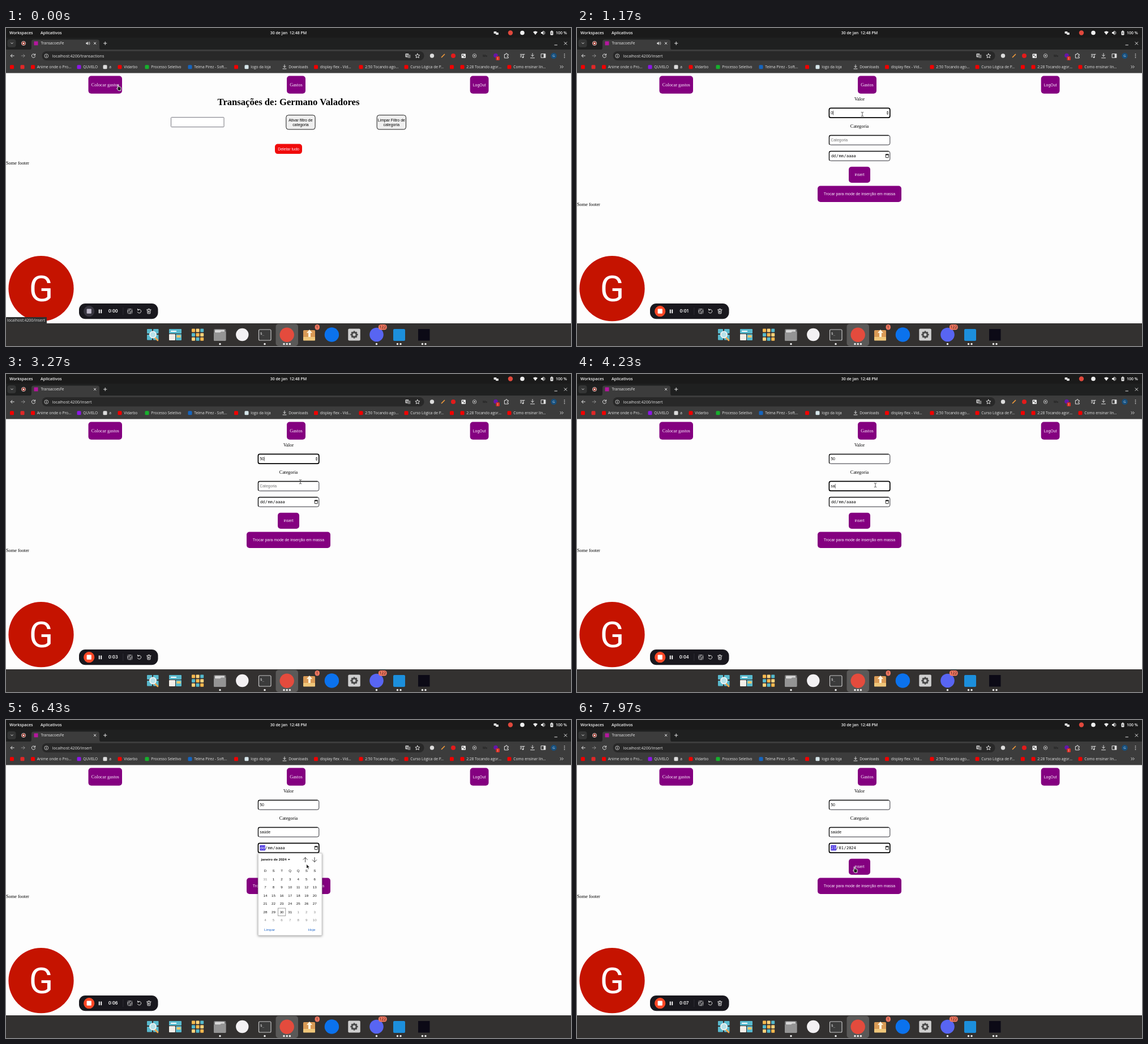
These frames come from a looping animation (998x561 px, 8000 ms). An HTML page:

```html
<!DOCTYPE html>
<html lang="pt-BR">
<head>
<meta charset="utf-8">
<title>Transações</title>
<style>
html, body { margin: 0; width: 100%; height: 100%; overflow: hidden; background: #fdfdfd; }
svg { display: block; width: 100vw; height: 100vh; }
text { white-space: pre; }
.ui { font-family: "Open Sans", "Noto Sans", sans-serif; }
.serif { font-family: "Liberation Serif", serif; font-size: 8.32px; }
.sans { font-family: "Liberation Sans", sans-serif; font-size: 6.93px; }
.mono { font-family: "DejaVu Sans Mono", monospace; font-size: 6.93px; }
.bold { font-weight: 700; }
.semi { font-weight: 600; }
.mid { text-anchor: middle; }
.line { fill: none; stroke: #e3e3e3; stroke-width: 1; stroke-linecap: round; stroke-linejoin: round; }
</style>
</head>
<body>
<svg viewBox="0 0 998 561" preserveAspectRatio="none">
  <g id="page"></g><g id="shell"></g><g id="overlay"></g>
</svg>
<script>
const LOOP = 8000;
const PURPLE = '#840080', BLUE = '#4a35e0', RED = '#f00b0b';

const rect = (x, y, w, h, fill, rx = 0, extra = '') =>
  `<rect x="${x}" y="${y}" width="${w}" height="${h}" rx="${rx}" fill="${fill}" ${extra}/>`;
const circle = (x, y, r, fill, extra = '') => `<circle cx="${x}" cy="${y}" r="${r}" fill="${fill}" ${extra}/>`;
const shape = (d, fill, extra = '') => `<path d="${d}" fill="${fill}" ${extra}/>`;
const line = (d, extra = '') => `<path class="line" d="${d}" ${extra}/>`;
const text = (x, y, str, cls, fill = '#000', size) =>
  `<text x="${x}" y="${y}" class="${cls}" fill="${fill}" ${size ? `style="font-size:${size}px"` : ''}>${str}</text>`;
const range = n => [...Array(n).keys()];

// ---------- desktop and browser frame ----------
function topBar() {
  return rect(0, 0, 998, 17, '#1a1a1a') +
    text(6, 11, 'Workspaces', 'ui semi', '#f4f4f4', 7.2) +
    text(61, 11, 'Aplicativos', 'ui semi', '#f4f4f4', 7.2) +
    text(499, 11, '30 de jan  12:48 PM', 'ui semi mid', '#f4f4f4', 7) +
    text(971, 11, '100 %', 'ui semi', '#f4f4f4', 7) +
    rect(861.5, 6, 5, 4, '#ddd', 1) + rect(865, 8, 5, 4, '#ddd', 1) +
    circle(891, 8.5, 4.2, '#e0483c') + circle(912, 8.5, 3.8, '#eee') +
    shape('M931 7q4-3 8 0l-4 5z', '#eee') +
    shape('M945 7h2l2.5-2.5v8l-2.5-2.5h-2z', '#eee') + line('M951 6q2 2.5 0 5') +
    rect(961.5, 5.5, 5, 7, '#eee', 1) + rect(963, 4.5, 2, 1, '#eee') +
    shape('M964.4 6.5l-1.8 3h1.4l-.4 2 1.8-3h-1.4z', '#333');
}

function tabStrip() {
  return rect(0, 17, 998, 22, '#1f2020') +
    rect(2.5, 20, 15, 14, '#343535', 4) + line('M8.7 26l1.8 1.8 1.8-1.8') +
    circle(31, 27, 3.6, '#8f2418', 'stroke="#ddd" stroke-width=".9"') + circle(31, 27, 1.5, '#fff') +
    shape('M41 38.5q4 0 4-4v-10q0-4 4-4h112q4 0 4 4v10q0 4 4 4z', '#3c3c3c') +
    rect(49.5, 23.5, 7, 7, '#b5179e') +
    text(61.5, 29.3, 'TransacoesFe', 'ui', '#e8e8e8', 6.5) +
    line('M155.3 25.2l3.6 3.6m0-3.6l-3.6 3.6') +
    line('M172.5 27h5.4m-2.7-2.7v5.4') +
    line('M969 30h4.5m12.6-5.2l4.6 4.6m0-4.6l-4.6 4.6', 'stroke-width="1.2"');
}

function toolbar() {
  const extensions =
    circle(752.5, 49, 3.7, '#ddd') + line('M769.5 51.5l5-5', 'style="stroke:#ef9a3c;stroke-width:1.7"') +
    circle(790, 49, 4, '#e31b1b') + rect(804.5, 45.5, 7.5, 7.5, '#eee', 1) +
    rect(806, 47, 2, 2, '#444') + rect(808.5, 49.5, 2, 2, '#444') +
    circle(827.5, 49, 3.3, 'none', 'stroke="#bbb"') + circle(827.5, 49, 1.3, '#ccc') +
    text(846, 51, 'Ms', 'ui mid bold', '#222', 5.5) +
    circle(865, 48.5, 3.8, '#6517a8') + rect(865.5, 50, 6.5, 7, '#d93025', 1.5) +
    text(868.8, 55.6, '1', 'ui mid', '#fff', 5) +
    line('M880.8 46.5h2q0-2 1.2-2t1.2 2h2v2q-2 0-2 1.2t2 1.2v2h-6.4z') +
    line('M908.5 46.5h5m-5 2.2h3m-3 2.2h2m3.5 1v-5.5h2') + circle(913, 51.8, 1.3, '#e3e3e3') +
    line('M930 44.8v5m-2.3-2l2.3 2.3 2.3-2.3M926.5 52.8h7') +
    line('M945.5 45.7h7.4v6.6h-7.4z') + rect(949.7, 46, 3, 6, '#e3e3e3') +
    circle(967.5, 49, 5.2, '#174f7c') + text(967.5, 51.2, 'G', 'ui mid', '#cfe5ff', 6) +
    [46, 49, 52].map(y => circle(986.5, y, .85, '#e3e3e3')).join('');
  return rect(0, 38, 998, 41.5, '#3c3c3c') +
    line('M14.2 49H8.3m2.6-2.7L8.3 49l2.6 2.7') +
    line('M27.2 49h5.9m-2.6-2.7l2.6 2.7-2.6 2.7', 'opacity=".45"') +
    line('M51.4 47.5a3.2 3.2 0 1 0 .2 2.7m0-4.5v2.4h-2.4') +
    rect(63.5, 41, 675, 16.3, '#282828', 8.1) +
    circle(71.3, 49.2, 3.4, 'none', 'stroke="#ddd" stroke-width=".8"') + line('M71.3 49v1.8m0-3.4v.1') +
    rect(705.5, 45, 5.8, 6.5, '#ccc', 1) + rect(709.5, 47, 5, 6, '#777', 1) +
    text(708.4, 50.2, 'G', 'ui mid bold', '#333', 4.5) +
    line('M726.8 45.2l1.2 2.5 2.8.3-2.1 1.9.6 2.7-2.5-1.4-2.4 1.4.6-2.7-2.1-1.9 2.8-.3z', 'stroke-width=".8"') +
    extensions;
}

function bookmarks() {
  const red = '#f00000';
  const items = [
    [10.5, red], [29, '#e02828'], [47.5, red, 'Anime onde o Pro...'], [129, '#8d16e8', 'QUVELO'],
    [175, '#ddd', 'a'], [201, red, 'Vidarbo'], [249, '#16b02c', 'Processo Seletivo'],
    [325, '#1565c0', 'Telma Pirez - Soft...'], [406.5, red], [425, '#d5e5ea', 'logo da loja'],
    [492, null, 'Downloads'], [547.5, red, 'display flex - Vid...'], [627, red, '2:50 Tocando ago...'],
    [707, red, 'Curso Lógica de P...'], [787.5, red], [806, red, '2:28 Tocando agor...'],
    [889, red, 'Como ensinar lin...']
  ];
  return items.map(([x, color, label]) =>
    (color ? rect(x - 3.5, 65.3, 7, 7, color, 1.5) : line(`M${x} 65v4.5m-2-2l2 2 2-2M${x - 3} 72h6`)) +
    (label ? text(x + 7.3, 71, label, 'ui', '#e3e3e3', 6.6) : '')).join('') +
    line('M979 66.5l2 2-2 2m3.2-4l2 2-2 2');
}

function dock() {
  const dot = x => circle(x, 557.5, 1.7, '#f2f2f2');
  const badge = (x, w, n) => rect(x - w / 2, 523, w, 9.5, '#ef765f', 4.5) + text(x, 530.2, n, 'ui mid', '#331a16', 6.8);
  const gridColors = ['#f8b84e', '#ffd27a', '#54b9cc'];
  const gearTeeth = range(8).map(i =>
    rect(613.7, 534.4, 2.6, 3, '#4b4b4b', 0, `transform="rotate(${i * 45} 615 541)"`)).join('');
  return rect(0, 521, 998, 40, '#333130') + rect(476.5, 522, 39.5, 39, '#5a5958', 5) +
    // launcher
    rect(249, 531, 9, 8, '#58b9cd', 1) + rect(260, 531, 9.5, 8, '#58b9cd', 1) +
    rect(249, 541, 9, 9.5, '#58b9cd', 1) + rect(260, 541, 9.5, 9.5, '#58b9cd', 1) +
    line('M263 546l5 5', 'style="stroke:#f3a64a;stroke-width:2.6"') +
    circle(259.5, 541, 5.6, '#b8e3ea', 'stroke="#f4f4f4" stroke-width="1.7"') +
    // workspaces
    rect(288, 531, 22, 8, '#58b9cd', 1) + rect(288, 540, 11, 11, '#f2eee8', 1) + rect(300, 540, 10, 11, '#58b9cd', 1) +
    rect(291, 534, 10, 2, '#fff') + rect(301.5, 542, 7, 4, '#f8c66a') +
    // applications
    range(9).map(i => rect(328 + i % 3 * 7.6, 530.6 + (i / 3 | 0) * 7.6, 6, 6, gridColors[(i + (i / 3 | 0) * 2) % 3], 1)).join('') +
    // files
    rect(367, 531, 21.5, 21, '#777', 2) + rect(369, 532.5, 17, 5, '#d9d9d9', 1) +
    shape('M367 537.5h11l2-2h8.5v15q0 1.5-1.5 1.5h-18.500q-1.5 0-1.5-1.5z', '#949494') +
    circle(417.3, 541, 11.2, '#f3f1f3') +
    // terminal
    rect(446.5, 532, 21.5, 19, '#3b3b3b', 2, 'stroke="#c5c5c5" stroke-width="1.2"') + text(449, 540.5, '$_', 'mono', '#eee', 6) +
    circle(496.2, 541.2, 12.7, '#e44b3d') +
    // package installer
    rect(525, 533, 21, 18, '#d99a55', 1.5) + rect(525, 545, 21, 6.5, '#f0c77a', 1) +
    shape('M536 532l5 6h-3v7h-4v-7h-3z', '#fff3dd') + badge(549.8, 8.5, '1') +
    circle(575.4, 541, 12.7, '#0b72ed') +
    // settings
    rect(604.3, 530.5, 21.500, 21, '#cfcfcf', 2) + gearTeeth + circle(615, 541, 4, 'none', 'stroke="#4b4b4b" stroke-width="3"') +
    circle(654.5, 541, 12.3, '#5865f2') + badge(665.3, 15, '122') +
    rect(684, 531, 21, 21, '#1c8fdc', 2) + rect(728, 531, 20.5, 20.5, '#0c0a16') +
    [378, 457, 491, 496.2, 501.400, 654.5, 691.5, 697, 735.5, 741].map(dot).join('');
}

function recorder() {
  return circle(62, 459.7, 57.6, '#c51300') +
    `<text x="62" y="482.300" class="mid" fill="#fff" style="font:400 62.5px Roboto,sans-serif">G</text>` +
    rect(129, 486, 139.5, 27.2, '#19181e', 11) +
    rect(163.8, 496.4, 1.900, 6.800, '#fff', .5) + rect(167.300, 496.4, 1.900, 6.800, '#fff', .5) +
    rect(206.5, 493, .7, 13, '#37363c') +
    range(16).map(i => circle(215 + i % 4 * 2.5, 496 + (i / 4 | 0) * 2.5, i % 3 ? .9 : .6, '#ddd')).join('') +
    line('M232.800 497.5a3.300 3.300 0 1 1-.5 3.500m.3-5.5v2.200h2.300') +
    line('M248.500 497h7.600m-5-1.300h2.500m-4 1.600l.5 6.500h4.500l.5-6.500m-3.700 2v2.500m1.500-2.500v2.500', 'stroke-width=".9"');
}

// ---------- web pages ----------
function button(x, y, w, h, label, cls = 'sans', fill = PURPLE) {
  const baseline = y + h / 2 + (cls === 'serif' ? 2.6 : 2.4);
  return rect(x, y, w, h, fill, 5) + text(x + w / 2, baseline, label, cls + ' mid', '#fbeefb');
}

const nav = button(145.5, 84.5, 59.5, 31.3, 'Colocar gastos', 'serif') +
  button(496, 84.5, 33, 31.3, 'Gastos', 'serif') + button(819.7, 84.5, 32.8, 31.3, 'LogOut');

function listPage() {
  const filter = (x, label) => rect(x, 153.7, 51.3, 25.2, '#efefef', 4, 'stroke="#1c1c1c"') +
    text(x + 25.6, 164.900, label, 'sans mid') + text(x + 25.6, 172.6, 'categoria', 'sans mid');
  return nav + text(499, 136.2, 'Transações de: Germano Valadores', 'serif mid bold', '#000', 16.63) +
    rect(291.5, 157.6, 93.5, 17, '#fff', 1, 'stroke="#76767f"') +
    filter(494.8, 'Ativar filtro de') + filter(655.2, 'Limpar Filtro de') +
    button(475, 204.5, 48, 17.6, 'Deletar tudo', 'sans', RED) + text(0, 241, 'Some footer', 'serif');
}

const fieldBox = (y, focused) =>
  rect(445.4, y + .4, 107.4, 16.8, '#fff', 3, `stroke="${focused ? '#000' : '#33333a'}" stroke-width="${focused ? 1.7 : 1}"`) +
  (focused ? '' : line(`M445.5 ${y + 16}V${y + 3}q0-2.500 2.500-2.500h102`, 'style="stroke:#111;stroke-width:1.3"'));

function textField(y, value, hint, focused, blinkOn) {
  const caret = focused && blinkOn ? rect(448.2 + value.length * 3.8, y + 4.8, .6, 8, '#000') : '';
  return fieldBox(y, focused) + text(448.2, y + 11.3, value || hint, 'sans', value ? '#111' : '#757575') + caret;
}

function dateField(day, month, year, focused) {
  const y = 228.2;
  return fieldBox(217, focused) + (focused ? rect(448.4, 221, 9.5, 9.2, BLUE) : '') +
    text(448.9, y, day, 'mono', focused ? '#fff' : '#000') + text(457.8, y, '/', 'mono') +
    text(462.5, y, month, 'mono') + text(471.4, y, '/', 'mono') + text(476, y, year, 'mono') +
    rect(545.3, 223, 5, 5.6, 'none', .5, 'stroke="#111" stroke-width=".9"') + rect(545, 222.5, 5.6, 1.8, '#111');
}

function calendar(selected, hovered) {
  const X = 458, Y = 280.5, STEP = 14.55, SIZE = 6.24;
  const dayCell = i => {
    const x = X + i % 7 * STEP, y = Y + (i / 7 | 0) * STEP;
    const outside = i < 1 || i > 31, day = i < 1 ? 31 : outside ? i - 31 : i;
    const active = i === selected;
    const cell = (fill, stroke, w) => rect(x - 6.7, y - 6.7, 13.4, 13.4, fill, 0, `stroke="${stroke}" stroke-width="${w}"`);
    const box = active ? cell(BLUE, '#000', 1.3) : i === 30 ? cell('#fff', '#888', .8) : i === hovered ? cell('#e6e6ea', 'none', 0) : '';
    return box + text(x, y + 2.2, day, 'sans mid' + (active ? ' bold' : ''), active ? '#fff' : outside ? '#858585' : '#111', SIZE);
  };
  return rect(445.3, 235, 112.7, 145, '#fff', 1, 'stroke="#c4c4c4" stroke-width=".8" style="filter:drop-shadow(0 1px 2px #0006)"') +
    text(450.5, 248.3, 'janeiro de 2024', 'sans bold', '#111', SIZE) + shape('M497.800 245.200h4l-2 2.300z', '#111') +
    line('M528.6 250.700v-8m-3.700 3.700l3.700-3.700 3.700 3.700M545 242.500v8m-3.700-3.700l3.700 3.700 3.700-3.700', 'style="stroke:#333;stroke-width:.9"') +
    [...'DSTQQSS'].map((d, i) => text(X + i * STEP, 267.6, d, 'sans mid', '#111', SIZE)).join('') +
    range(42).map(dayCell).join('') +
    text(456, 371.6, 'Limpar', 'sans', '#1f66c9', SIZE) + text(540, 371.6, 'Hoje', 'sans mid', '#1f66c9', SIZE);
}

// ---------- timeline ----------
const T = { page: 130, record: 300, focusValue: 1000, focusCategory: 3960, focusDate: 5430, open: 6130, pick: 6870, close: 7400 };
const VALUE = [[0, '0'], [1600, ''], [2450, '5'], [2650, '50']];
const CATEGORY = [[0, ''], [4070, 's'], [4230, 'sa'], [4430, 'saú'], [4600, 'saúd'], [5000, 'saúde']];
const MOUSE = [
  [0, 197, 100], [170, 197, 100], [550, 500, 155], [800, 500, 155], [1000, 504, 152], [3130, 504, 152],
  [3270, 520, 190], [3430, 527, 196], [5190, 527, 196], [5280, 534, 222], [5430, 535, 224], [5650, 540, 229],
  [5850, 547, 226], [6270, 547, 226], [6730, 489, 326], [7430, 489, 327], [7800, 489, 259], [8000, 489, 259]
];

const latest = (steps, t) => steps.filter(s => s[0] <= t).pop()[1];

function mouseAt(t) {
  const i = MOUSE.findIndex(p => p[0] > t);
  const [t0, x0, y0] = MOUSE[i - 1], [t1, x1, y1] = MOUSE[i];
  const u = (t - t0) / (t1 - t0), k = u * u * (3 - 2 * u);
  return [x0 + (x1 - x0) * k, y0 + (y1 - y0) * k];
}

const inside = ([x, y], left, top, w, h) => x >= left && x <= left + w && y >= top && y <= top + h;
const overNav = p => inside(p, 145, 84, 60, 32);
const overValue = p => inside(p, 445, 141, 108, 18);

function cursor(p, t) {
  const onPage = t >= T.page, popup = t >= T.open && t < T.close;
  const outline = 'stroke="#fff" stroke-width=".9" stroke-linejoin="round"';
  let art = shape('M0 0v8l1.900-1.700 1.300 2.900 1.500-.7-1.300-2.800h2.600z', '#111', outline);
  if (overNav(p) || onPage && !popup && inside(p, 480, 245, 38, 28))
    art = shape('M.2 0q1-.6 1.500.5v3l3.300.6q1.300.4 1.200 1.600l-.5 4.800h-4.200l-2.500-3.500q-.6-1.300.6-1.100l.6.5z', '#222', outline);
  else if (onPage && !popup && (overValue(p) || inside(p, 445, 189, 108, 17)))
    art = line('M-1.800-3.500q1.800 0 1.800.7v5.800q0 .7-1.800.7M1.800-3.500q-1.800 0-1.800.7m0 5.800q0 .7 1.800.7', 'style="stroke:#444;stroke-width:.9"');
  return `<g transform="translate(${p})">${art}</g>`;
}

function insertPage(t, p) {
  const onValue = t >= T.focusValue && t < T.focusCategory;
  const onCategory = t >= T.focusCategory && t < T.focusDate;
  const blinkOn = (t + 30) % 1000 < 500 || t > 1900 && t < 2100;
  const date = t >= T.close ? ['23', '01', '2024'] : ['dd', 'mm', 'aaaa'];
  const spinner = onValue || overValue(p) ? shape('M546.500 149.100l2.100-2.400 2.100 2.400zm0 1.300l2.100 2.400 2.100-2.400z', '#333') : '';
  const row = Math.round((p[1] - 280.5) / 14.55), column = Math.round((p[0] - 458) / 14.55);
  return nav + text(499, 128.4, 'Valor', 'serif mid') +
    textField(141, latest(VALUE, t), 'Valor', onValue, blinkOn) + spinner +
    text(499, 176.2, 'Categoria', 'serif mid') +
    textField(189, latest(CATEGORY, t), 'Categoria', onCategory, blinkOn) +
    dateField(...date, t >= T.focusDate) +
    button(480, 244.8, 38, 28.2, 'insert') +
    button(425, 278.6, 148, 28.4, 'Trocar para mode de inserção em massa') +
    text(0, 314.2, 'Some footer', 'serif') +
    (t >= T.open && t < T.close ? calendar(t >= T.pick ? 23 : null, row * 7 + column) : '');
}

function overlay(t, p) {
  const recording = t >= T.record;
  const speaker = Math.max(0, Math.min(1, (2130 - t) / 430));
  const path = t < T.page ? 'transactions' : 'insert';
  return text(81.700, 51.700, 'localhost:4200/' + path, 'ui', '#e6e6e6', 7.15) +
    `<g opacity="${speaker}">` + shape('M141.300 25.800h1.400l2-1.800v6l-2-1.800h-1.400z', '#ddd') +
    line('M146 25.500q1.400 1.500 0 3m1.200-4.200q2.300 2.700 0 5.400', 'style="stroke-width:.7"') + '</g>' +
    (overNav(p) ? rect(0, 510, 72, 11.5, '#303030', 1) + text(2, 518, 'localhost:4200/insert', 'ui', '#e0e0e0', 6.85) : '') +
    circle(146.7, 499.7, 9.6, recording ? '#ff4826' : '#37353f') +
    rect(142.6, 495.6, 8.2, 8.2, recording ? '#fff' : '#bbb5c6', 1) +
    `<text x="189.200" y="502.300" class="mid" fill="#fff" style="font:600 7.400px Inter,sans-serif">0:0${t / 1000 | 0}</text>` +
    cursor(p, t);
}

const layer = id => document.getElementById(id);
layer('shell').innerHTML = topBar() + tabStrip() + toolbar() + bookmarks() + recorder() + dock();

function draw(now) {
  const t = now % LOOP, p = mouseAt(t);
  layer('page').innerHTML = rect(0, 79, 998, 443, '#fdfdfd') + (t < T.page ? listPage() : insertPage(t, p));
  layer('overlay').innerHTML = overlay(t, p);
}

const start = performance.now();
const tick = () => {
  draw(performance.now() - start);
  requestAnimationFrame(tick);
};
tick();
</script>
</body>
</html>
```
